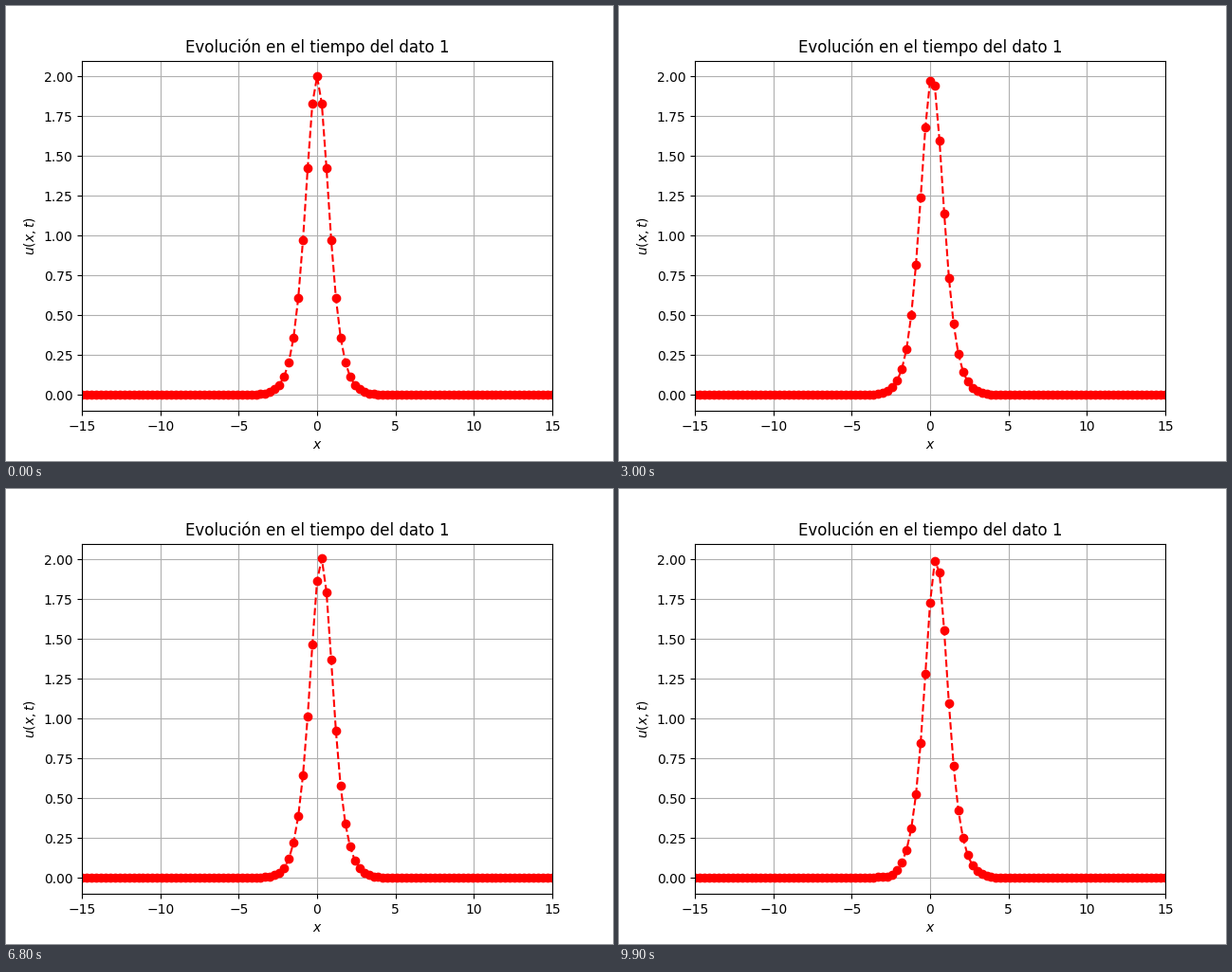
Animation of 640x480 px, one loop 10000 ms. Source, as a matplotlib script:

```python
import numpy as np
import matplotlib.pyplot as plt
from matplotlib.animation import FuncAnimation

FRAMES = 100
DT = 0.001
L = 15

x = np.linspace(-L, L, 101)
dx = x[1] - x[0]


def rhs(u):
    """KdV, u_t = -3 (u^2)_x - u_xxx, with centred differences."""
    def at(k):
        return np.roll(u, -k)
    flux = 3 * (at(1)**2 - at(-1)**2) / (2 * dx)
    disp = (at(2) - 2 * at(1) + 2 * at(-1) - at(-2)) / (2 * dx**3)
    return -flux - disp


def solve():
    sol = [2 / np.cosh(x)**2]
    for _ in range(FRAMES - 1):
        u = sol[-1]
        sol.append(u + DT * rhs(u))
    return sol


sol = solve()

plt.rcParams["font.family"] = "DejaVu Sans"
fig, ax = plt.subplots(figsize=(6.4, 4.8), dpi=100)
line, = ax.plot(x, sol[0], "ro--")
ax.set_xlim(-L, L)
ax.set_ylim(-0.1, 2.1)
ax.set_title("Evolución en el tiempo del dato 1")
ax.set_xlabel("$x$")
ax.set_ylabel("$u(x,t)$")
ax.grid(True)


def update(n):
    line.set_ydata(sol[n])
    return line,


anim = FuncAnimation(fig, update, frames=FRAMES, interval=100,
                     repeat=True, repeat_delay=0)
plt.show()
```
